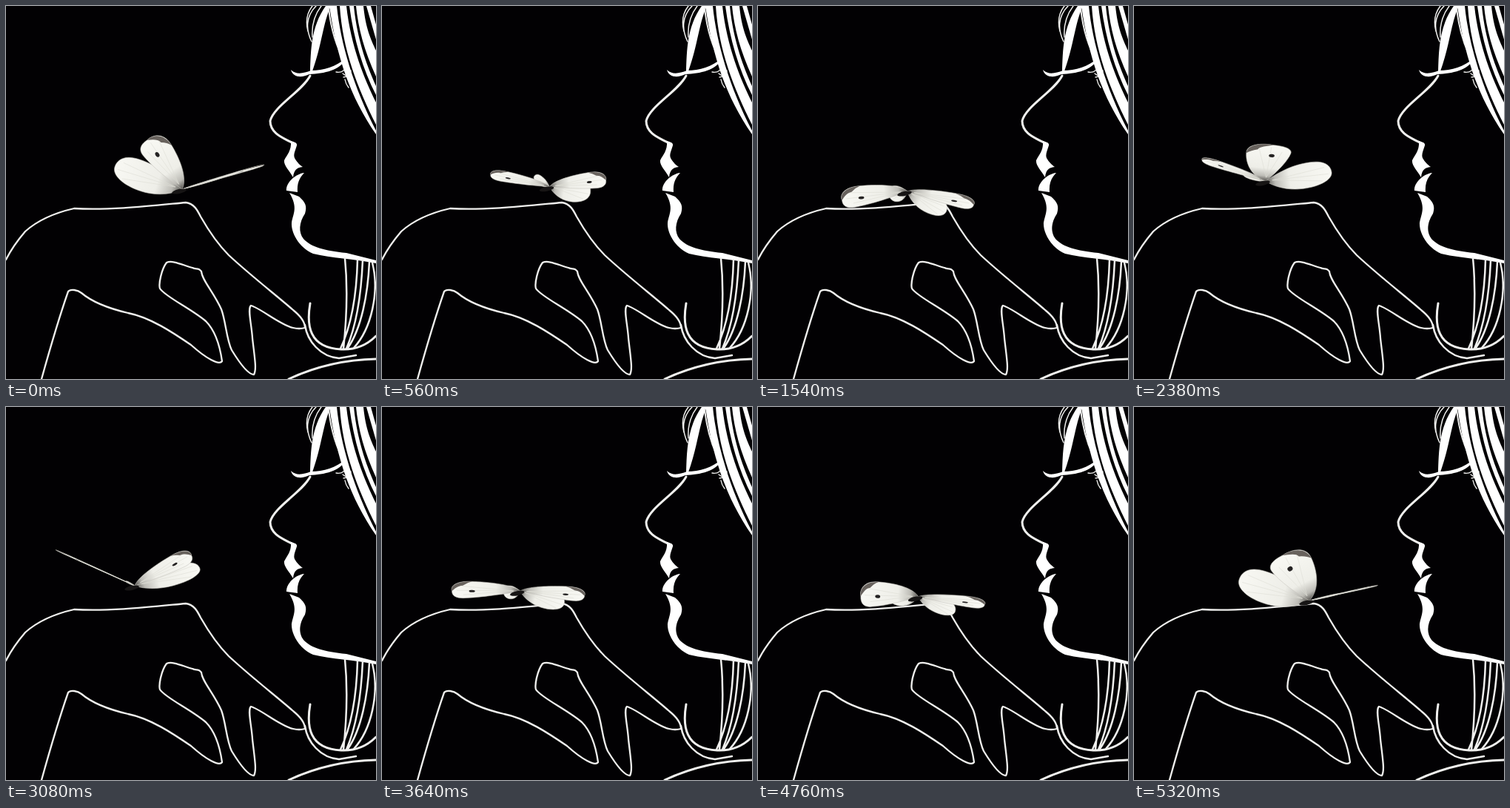
Animation, 500 px wide and 503 px high, one loop 5.46 s. Source, as an HTML page:

```html
<!DOCTYPE html>
<html lang="en">
<head>
<meta charset="utf-8">
<title>Butterfly on a hand</title>
<style>
  html, body { margin: 0; width: 100%; height: 100%; overflow: hidden; background: #020103; }
  svg { display: block; width: 100%; height: 100%; }
  .line { fill: none; stroke: #f0f0ee; stroke-linecap: round; stroke-linejoin: round; }
  .ink { fill: #fff; }
  .wing path { vector-effect: non-scaling-stroke; }
</style>
</head>
<body>
<svg viewBox="0 0 500 503">
  <defs>
    <linearGradient id="wingFill" gradientUnits="userSpaceOnUse" x1="0" y1="0" x2="1" y2="0">
      <stop offset="0" stop-color="#55534f"/>
      <stop offset=".14" stop-color="#bdbcb6"/>
      <stop offset=".36" stop-color="#eeeee8"/>
      <stop offset="1" stop-color="#f8f8f3"/>
    </linearGradient>
  </defs>
  <rect width="500" height="503" fill="#020103"/>

  <!-- hand -->
  <path class="line" stroke-width="2.3" d="M0 342C8 326 20 311 26 304C45 287 70 278 92 273C140 276 200 269 243 265C254 266 259 276 263 284C275 305 287 322 301 336C330 363 370 394 388 410C398 418 404 427 404 434Q396 436 388 434C370 430 345 408 331 404C326 408 332 430 333 448C336 475 339 490 335 497C328 497 316 482 305 464C298 450 297 425 291 409C280 385 265 370 264 358C260 352 257 356 252 353C240 350 225 342 217 346C210 355 206 375 208 381C215 392 250 408 270 425C285 440 290 465 292 479C288 485 270 475 250 457C225 440 195 420 165 414C135 407 115 398 102 387C97 383 87 381 84 385C77 405 60 460 48 503"/>

  <!-- face -->
  <path class="line" stroke-width="3" d="M411 94C400 115 362 135 357 155C357 172 375 178 386 184"/>
  <g class="ink">
    <path d="M385 86C392 93 402 91 412 87C430 87 445 82 460 70C452 87 430 91 410 92C400 97 388 97 385 86Z"/>
    <path d="M385 182C388 183 394 184 393 188C391 195 388 200 390 205C394 212 398 215 401 217C392 218 389 222 388 231C383 222 375 215 376 208C380 200 386 195 385 182Z"/>
    <path d="M403 225C392 226 378 238 379 249L394 251C393 240 396 232 403 225Z"/>
    <path d="M383 252L396 257C405 265 407 270 404 280C396 292 395 305 402 314C412 325 430 330 460 333L500 343V347C470 341 440 340 415 334C395 325 385 305 386 292C388 280 395 272 383 252Z"/>
    <path d="M432 0H439C428 24 427 52 414 88H411C412 60 412 28 432 0Z"/>
  </g>
  <g class="line">
    <path stroke-width="1.5" d="M419 0C405 14 405 32 413 48M414 0C406 10 405 22 408 34M426 0C416 13 413 28 414 42"/>
    <path stroke-width="2" d="M436 3C439 30 446 55 458 75"/>
    <path stroke-width="1.4" d="M446 89C454 91 460 85 461 79M455 91Q464 98 462 90M456 96Q466 95 466 87M458 99Q459 105 463 110M462 98L466 105"/>
  </g>

  <!-- hair -->
  <g class="ink">
    <path d="M437 0H447C452 50 470 110 500 168V173C465 122 447 70 437 0Z"/>
    <path d="M451 0H460C466 55 485 100 500 130V160C475 110 455 60 451 0Z"/>
    <path d="M464 0H470C475 50 490 85 500 108V120C482 85 470 45 464 0Z"/>
    <path d="M473 0H483C486 30 493 45 500 60V95C484 60 476 30 473 0Z"/>
    <path d="M487 0H493L500 25V45Z"/>
    <path d="M453 66C459 97 474 130 490 151C475 118 463 92 457 66Z"/>
  </g>

  <!-- neck and shoulder -->
  <g class="line">
    <path stroke-width="2.5" d="M458 340C462 380 460 425 456 462M475 342C474 385 467 430 452 462M482 343C480 390 474 430 460 462M491 345C489 390 480 435 462 461M495 346C505 385 494 435 470 461"/>
    <path stroke-width="3" d="M411 401C406 430 409 461 453 463C475 464 490 455 500 445"/>
    <path stroke-width="2.5" d="M404 430C407 452 425 473 450 475L473 471"/>
    <path stroke-width="3" d="M382 503C410 490 450 477 500 476"/>
  </g>
  <g id="butterfly"></g>
</svg>
<script>
const STEP = 140, STEPS = 39;
const SVG_NS = "http://www.w3.org/2000/svg";
const butterfly = document.getElementById("butterfly");

const FORE = "M0 0C.1 -.7 .45 -1 .75 -1C.98 -1 1.05 -.3 1.02 .2C1.02 .8 .95 1.02 .85 1C.6 .9 .2 .35 0 0Z";
const HIND = "M0 0C.2 -.5 .4 -1 .7 -1C.95 -1 1 -.4 1 0C1 .6 .8 1 .55 1C.3 1 .1 .5 0 0Z";
const TIP = "M.72 -1C.97 -1 1.05 -.3 1.02 .2C.98 -.1 .94 -.45 .86 -.5Q.8 -.85 .72 -1Z";
const VEINS = "M.1 0L.9 -.45M.1 0L.95 .1M.1 0L.85 .6";

// Each wing is [tip x, tip y, signed half width], measured from the body.
const pose = (step, x, y, leftFore, rightFore, leftHind, rightHind) =>
  ({ step, values: [x, y, ...leftFore, ...rightFore, ...leftHind, ...rightHind] });
const flat = (step, x, y) =>
  pose(step, x, y, [-87, 9, -14], [88, 16, 9], [-25, 5, -11], [52, 28, 13]);

const poses = [
  pose(0, 238, 247, [-43, -67, -20], [108, -32, 1.5], [-91, -30, -20], [55, -16, 1]),
  flat(3, 226, 245),
  pose(7, 228, 240, [-50, -97, 13], [33, -92, 18], [-8, -72, 11], [64, -50, 23]),
  flat(11, 202, 250),
  pose(17, 178, 236, [-84, -29, -5], [5, -48, 30], [-30, -8, -3], [89, -12, 17]),
  flat(19, 178, 242),
  pose(22, 174, 241, [-104, -47, -.6], [74, -42, 11], [-12, -6, -1], [88, -23, 13]),
  flat(27, 190, 250),
  pose(30, 203, 247, [-32, -56, -29], [88, -19, .8], [-100, -22, -19], [40, -9, 1]),
  flat(35, 220, 258),
  pose(38, 237, 261, [-31, -62, -28], [90, -20, .8], [-95, -28, -21], [40, -9, 1])
];
poses.push({ ...poses[0], step: STEPS });

function add(parent, tag, attributes) {
  const node = document.createElementNS(SVG_NS, tag);
  for (const [name, value] of Object.entries(attributes)) node.setAttribute(name, value);
  return parent.appendChild(node);
}

function makeWing(isFore) {
  const wing = add(butterfly, "g", { class: "wing" });
  add(wing, "path", { d: isFore ? FORE : HIND, fill: "url(#wingFill)", stroke: "#c9c8c2", "stroke-width": .6 });
  add(wing, "path", { d: VEINS, fill: "none", stroke: "#deded5", "stroke-width": .6 });
  if (isFore) {
    add(wing, "path", { d: TIP, fill: "#68625d" });
    add(wing, "ellipse", { cx: .72, cy: .15, rx: .045, ry: .13, fill: "#252323" });
  }
  return wing;
}

const hinds = [makeWing(false), makeWing(false)];
const wings = [makeWing(true), makeWing(true), ...hinds];
const body = add(butterfly, "ellipse", { rx: 10, ry: 3, fill: "#171515" });

function valuesAt(step) {
  const next = poses.findIndex(p => p.step > step);
  const from = poses[next - 1], to = poses[next];
  const mix = (step - from.step) / (to.step - from.step);
  return from.values.map((value, i) => value + (to.values[i] - value) * mix);
}

function draw(time) {
  const [x, y, ...shape] = valuesAt(Math.floor(time / STEP) % STEPS);
  wings.forEach((wing, i) => {
    const [tipX, tipY, width] = shape.slice(i * 3, i * 3 + 3);
    const scale = width / Math.hypot(tipX, tipY);
    wing.setAttribute("transform", `matrix(${tipX} ${tipY} ${-tipY * scale} ${tipX * scale} ${x} ${y})`);
  });
  body.setAttribute("transform", `translate(${x - 4} ${y + 3}) rotate(-12)`);
}

const start = performance.now();
function tick() {
  draw(performance.now() - start);
  requestAnimationFrame(tick);
}
tick();
</script>
</body>
</html>
```
